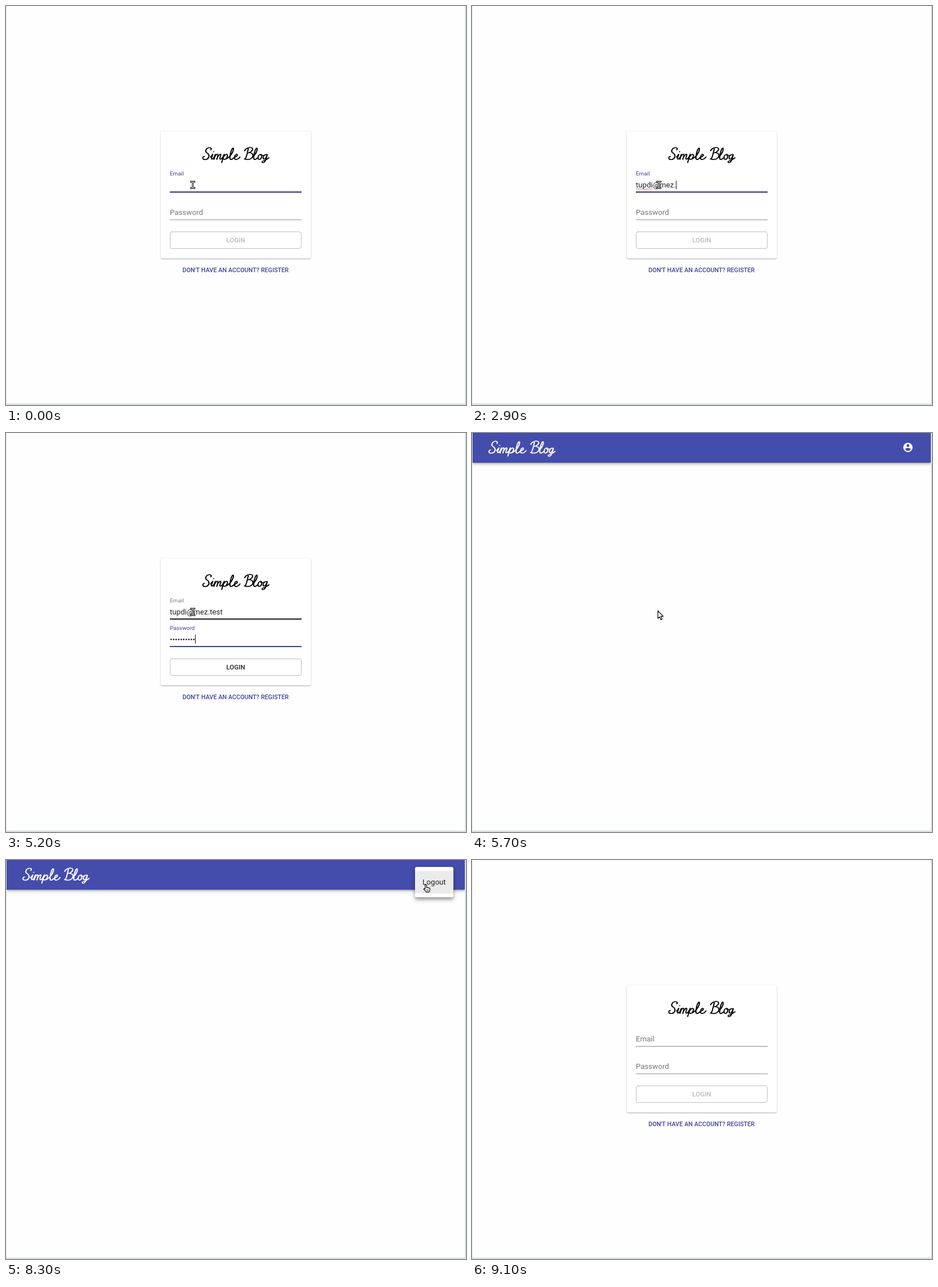
An HTML page with a canvas for the animation above (9500 ms loop, 803 by 697 pixels).

```html
<!DOCTYPE html>
<html lang="en">
<head>
<meta charset="utf-8">
<title>Login demo</title>
<style>
  html, body { margin: 0; width: 100%; height: 100%; overflow: hidden; background: #fefefe; }
  canvas { display: block; width: 803px; height: 697px; }
</style>
</head>
<body>
<canvas id="stage" aria-label="Simple Blog login demo"></canvas>
<script>
const W = 803, H = 697, LOOP = 9500, STEP = 100;
const INDIGO = '#444dab', ACCENT = '#3c4498', INK = 'rgba(0,0,0,.87)', GREY = 'rgba(0,0,0,.54)';
const BODY = 13.12;

const canvas = document.getElementById('stage');
const ctx = canvas.getContext('2d');
const dpr = window.devicePixelRatio || 1;
canvas.width = Math.round(W * dpr);
canvas.height = Math.round(H * dpr);

// One key press time per character.
const EMAIL = 'tupdi@mez.test';
const emailKeys = [700, 800, 1000, 1200, 1200, 2100, 2400, 2500, 2600, 2900, 3000, 3100, 3200, 3200];
const passwordKeys = [3800, 3900, 4100, 4300, 4300, 4700, 4800, 4900, 5100, 5200];

const TAB = 3400, ENABLE = 4700, SIGN_IN = 5700, MENU = 7600, SIGN_OUT = 8700;

// Pointer positions, each held until the next: time, shape, x, y.
const pointerKeys = [
  [0, 'beam', 326, 312.5], [SIGN_IN, 'arrow', 324.5, 310.5],
  [6600, 'arrow', 440, 296], [6700, 'arrow', 640, 250], [6800, 'arrow', 795, 197], [6900, 'none', 0, 0],
  [7100, 'arrow', 782, 4], [7200, 'hand', 770, 19], [7300, 'hand', 763, 23.5], [7400, 'hand', 761, 25.5],
  [7700, 'arrow', 760, 30], [7800, 'arrow', 743, 141], [7900, 'arrow', 674.5, 161],
  [8000, 'arrow', 703, 95], [8100, 'hand', 724, 54], [8200, 'hand', 728, 44], [8300, 'hand', 728.5, 42.5],
  [SIGN_OUT, 'arrow', 590, 82], [8800, 'arrow', 387, 59.5], [9000, 'arrow', 90.5, 1.5], [9100, 'none', 0, 0]
];

// Script lettering; origin at the left end of the baseline.
const smallL = 'M46.5-4C50-8 54.5-15 54-19C53.5-21.5 50.5-18 49-11C47.8-5 47 .3 49.5.2C51.5.2 53.5-1.5 55-3';
const title = new Path2D([
  'M14.5-16.5C16.5-19.5 14-21.3 10.5-20.3C6-19 4-14.5 7-12C10-10 12.5-8 11-4C9.5.5 3 1.5 1-1C0-3 1-5.5 3.5-5.5',
  'M14-4C16-6 17-8 18-9L15.8-3C15 0 17 .3 19-2M19.3-13.2L19.5-13.6',
  'M19-2C20.5-4 21.5-6 22.5-9L20 0M20.5-2C22-6 24.5-9.3 26.5-9C27.8-8.6 26-4 25 0',
  'M25.6-2.5C27-6 30-9.5 31.6-9C33-8.4 30.5-4.5 30.3-2C30.2.5 32.5 0 34.5-2.5',
  'M34.5-2.5C36-4.5 37-7 38-9L33.4 5.6M36-3C38-7 41-10 43-8.5C45-6.5 42-.5 39 0C37.5.2 36.5-.5 36.2-1.8M40-.3C43-1 45-3 46.5-4.5',
  smallL,
  'M55-3C57.5-4 61-6 60.8-8C60.5-9.8 57-9 56-4.5C55 0 58 1 60.5-.2C62.5-1.2 64-2.5 65.5-4.5',
  'M80-18.5C78-11 77-4 74.5-.8M73.5-15C75-19.5 82-21.8 86-20.3C90-18.5 86-12.5 79.5-11.5C86-12.5 89.5-9 87.5-4.5C85.5-.3 78.5 1.5 73-.8',
  'M101.5-9C97-8.5 95.5-1 98.8 0C102.5.5 105-6.5 102.3-8.7C100.5-9 101-5.5 106.5-7',
  'M113-8C110-10 106-6.5 105.8-3C105.7.3 109 .5 111-3.5L113-8.7C112-3 110.5 2 108 4.6C106 6.6 103 5.6 104.5 3.6C106 2 112 1.5 116-3'
].join(''));
title.addPath(new Path2D(smallL), new DOMMatrix([1, 0, 0, 1, 41.5, 0]));

const arrowShape = new Path2D('M0 0V13.4L3 10.7L5.2 15.8L7.4 14.9L5.2 9.9H9.3Z');
const handShape = new Path2D('M3.2 8.2V1.7a1.2 1.2 0 0 1 2.4 0V5.4l4.7 1q1.5.3 1.3 1.9L11 11L10.2 13.4H4.7L4 11.8L.8 8.9q-.4-1.5 1-1.3Z');
const beamShape = new Path2D('M-3-5.5H-1L0-4.5L1-5.5H3M0-4.5V4.5M-3 5.5H-1L0 4.5L1 5.5H3');
const shoulders = new Path2D('M0 7.2c-2.5 0-4.7-1.3-6-3.2 0-2 4-3.1 6-3.1s6 1.1 6 3.1c-1.3 1.9-3.5 3.2-6 3.2z');

const clamp = v => Math.max(0, Math.min(1, v));
const easeOut = v => 1 - (1 - clamp(v)) ** 3;
const mix = (a, b, p) => a + (b - a) * p;
const pressed = (keys, t) => keys.filter(k => k <= t).length;

function rect(x, y, w, h, color) {
  ctx.fillStyle = color;
  ctx.fillRect(x, y, w, h);
}

function circle(x, y, r, color) {
  ctx.fillStyle = color;
  ctx.beginPath();
  ctx.arc(x, y, r, 0, 7);
  ctx.fill();
}

function text(str, x, y, size, color, weight = 400, align = 'left') {
  ctx.font = `${weight} ${size}px Roboto, sans-serif`;
  ctx.textAlign = align;
  ctx.fillStyle = color;
  ctx.fillText(str, x, y);
  return ctx.measureText(str).width;
}

function at(x, y, draw) {
  ctx.save();
  ctx.translate(x, y);
  draw();
  ctx.restore();
}

// shadows: list of [offset, blur, alpha]
function panel(x, y, w, h, r, color, shadows) {
  ctx.save();
  ctx.beginPath();
  ctx.roundRect(x, y, w, h, r);
  ctx.fillStyle = color;
  for (const [offset, blur, alpha] of shadows) {
    ctx.shadowColor = `rgba(0,0,0,${alpha})`;
    ctx.shadowOffsetY = offset * dpr;
    ctx.shadowBlur = blur * dpr;
    ctx.fill();
  }
  ctx.restore();
}

function drawTitle(x, y, color) {
  ctx.strokeStyle = color;
  ctx.lineWidth = 1.25;
  ctx.lineCap = ctx.lineJoin = 'round';
  for (const shift of [-.4, .4]) at(x + shift, y, () => ctx.stroke(title));
}

function label(str, base, floatY, p, color) {
  text(str, 286, mix(base, floatY, p), BODY * mix(1, .75, p), color);
}

function growLine(y, p, color) {
  rect(401 - 115 * p, y, 230 * p, 2, color);
}

function squiggle(x, y, width) {
  ctx.beginPath();
  for (let i = 0; i <= width; i += 1.5) ctx.lineTo(x + i, y + (i / 1.5 % 2 ? .8 : -.8));
  ctx.strokeStyle = 'rgba(220,50,50,.8)';
  ctx.lineWidth = .9;
  ctx.stroke();
}

function drawLogin(t) {
  const fresh = t >= SIGN_OUT;
  const tabbed = !fresh && t >= TAB;
  const p = tabbed ? easeOut((t - TAB + 50) / 250) : 0;

  panel(270, 219, 262, 222, 3.3, '#fff', [[1, 1, .16], [1, 2.5, .2], [0, 1, .14]]);
  drawTitle(343, 268, '#000');

  if (fresh) {
    label('Email', 317, 296, 0, GREY);
    rect(286, 325, 230, 1, 'rgba(0,0,0,.46)');
  } else {
    label('Email', 317, 296, 1, tabbed ? 'rgba(0,0,0,.5)' : ACCENT);
    rect(286, 324, 230, 2, '#1c1c1e');
    if (p < 1) growLine(324, 1 - p, '#30346f');
    const typed = EMAIL.slice(0, pressed(emailKeys, t));
    const width = text(typed, 286, 317.2, BODY, INK);
    const caretOn = t >= 300 && !(t >= 1900 && t < 2100) && !tabbed;
    if (caretOn) rect(Math.round(286 + width), 305, 1, 15, '#111');
    if (t >= 2100 && !tabbed) squiggle(286, 319.6, ctx.measureText(EMAIL.slice(0, 5)).width);
  }

  label('Password', 364.5, 343.5, p, tabbed ? ACCENT : GREY);
  rect(286, 373, 230, 1, 'rgba(0,0,0,.42)');
  if (tabbed) {
    growLine(372, p, '#39429e');
    const width = text('•'.repeat(pressed(passwordKeys, t)), 286, 364.5, BODY, INK);
    rect(Math.round(286 + width), 352, 1, 16, '#111');
  }

  ctx.beginPath();
  ctx.roundRect(286.5, 394.5, 229, 29, 3.3);
  ctx.strokeStyle = 'rgba(0,0,0,.25)';
  ctx.lineWidth = 1;
  ctx.stroke();
  const enabled = fresh ? 0 : clamp((t - ENABLE + 50) / 250);
  text('LOGIN', 401, 413, 11.48, `rgba(0,0,0,${mix(.27, .87, enabled)})`, 500, 'center');
  text("DON'T HAVE AN ACCOUNT? REGISTER", 400.7, 465.3, 10.66, ACCENT, 500, 'center');
}

function drawMenu(t) {
  const p = easeOut((t - MENU + 50) / 250);
  ctx.save();
  ctx.globalAlpha = p;
  ctx.translate(781, 12.5);
  ctx.scale(mix(.75, 1, p), mix(.56, 1, p));
  ctx.translate(-781, -12.5);
  panel(714, 12.5, 67, 52.5, 3.3, '#fff', [[4, 4, .2], [5, 8, .16], [2, 10, .12]]);
  rect(714, 19, 67, 39.5, t >= 8600 ? '#dcdcdc' : '#ebebeb');
  text('Logout', 727, 43, BODY, INK);
  ctx.restore();
}

function drawHome(t) {
  panel(1, -6, 799.5, 57.5, 0, INDIGO, [[1.5, 3, .2], [3, 4, .14], [1, 7, .12]]);
  drawTitle(29, 35, '#fff');
  if (t >= 7200 && t < MENU + STEP) circle(761, 25.3, 19.5, `rgba(0,0,0,${t < 7300 ? .06 : .1})`);
  circle(761, 25.3, 8.2, '#fff');
  circle(761, 22, 2.46, INDIGO);
  at(761, 25.3, () => {
    ctx.scale(.82, .82);
    ctx.fillStyle = INDIGO;
    ctx.fill(shoulders);
  });
  if (t >= MENU) drawMenu(t);
}

function drawPointer(t) {
  const [, shape, x, y] = pointerKeys.findLast(k => k[0] <= t);
  if (shape === 'none') return;
  at(x, y, () => {
    ctx.lineJoin = 'round';
    ctx.lineCap = 'square';
    ctx.strokeStyle = '#000';
    if (shape === 'beam') {
      ctx.lineWidth = 2.8;
      ctx.stroke(beamShape);
      ctx.strokeStyle = '#fff';
      ctx.lineWidth = 1;
      ctx.stroke(beamShape);
      return;
    }
    const path = shape === 'hand' ? handShape : arrowShape;
    ctx.fillStyle = '#fff';
    ctx.fill(path);
    ctx.lineWidth = 1.15;
    ctx.stroke(path);
    if (shape === 'hand') {
      ctx.lineWidth = .8;
      ctx.stroke(new Path2D('M6.3 9V11M8.2 9V11'));
    }
  });
}

function drawFrame(t) {
  ctx.setTransform(dpr, 0, 0, dpr, 0, 0);
  rect(0, 0, W, H, '#fefefe');
  if (t >= SIGN_IN && t < SIGN_OUT) drawHome(t);
  else drawLogin(t);
  rect(0, 0, 1, H, '#e1e5e6');
  rect(801, 0, 2, H, '#d8e0e2');
  rect(0, 694.5, W, 2.5, '#d8e0e2');
  drawPointer(t);
}

const start = performance.now();
function tick() {
  const t = (performance.now() - start) % LOOP;
  drawFrame(Math.floor(t / STEP) * STEP);
  requestAnimationFrame(tick);
}
tick();
</script>
</body>
</html>
```
